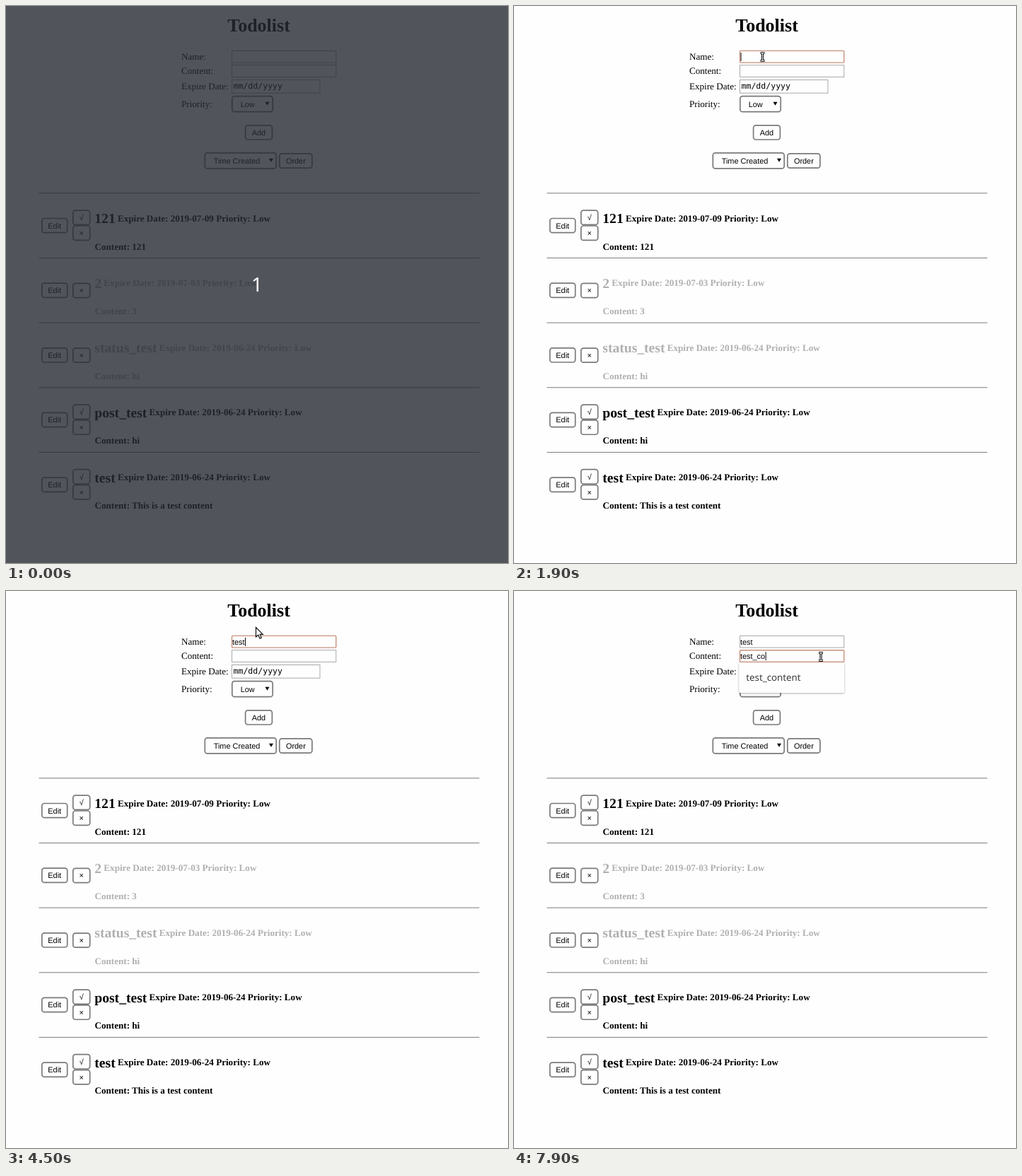
An HTML page for the animation above (8 s loop, 710 by 788 pixels).

```html
<!DOCTYPE html>
<html lang="en">
<head>
<meta charset="utf-8">
<title>Todolist</title>
<style>
  html, body { margin: 0; width: 100%; height: 100%; overflow: hidden; background: #fefefe; }
  svg { display: block; width: 710px; height: 788px; }
  text { font: 13.12px "Liberation Serif", serif; text-rendering: geometricPrecision; white-space: pre; }
  .title { font-size: 26px; font-weight: bold; text-anchor: middle; }
  .item text, .item tspan { font-weight: bold; }
  .name { font-size: 19.6px; }
  .done { fill: #b0b0b0; }
  .ui { font: 10.9px "Liberation Sans", sans-serif; }
  .mid { text-anchor: middle; }
  .date { font: 11.55px "DejaVu Sans Mono", monospace; }
  .btn { fill: #fefefe; stroke: #7a7a7a; stroke-width: 1.7; }
  .field { fill: #fefefe; stroke: #a9a9a9; }
  .focus { stroke: #c8917c; stroke-width: 1.4; }
  .rule { stroke: #7b7b7b; }
  .list { filter: drop-shadow(0 1px 1.5px rgba(0, 0, 0, .3)); }
  .list text { font: 500 13.3px "Noto Sans", sans-serif; fill: #3c3c3c; }
  .ime text { font: 15.5px "Noto Sans CJK SC", "Noto Sans CJK", sans-serif; fill: #2d7fc1; }
  .ime .first { fill: #b8201c; }
  .count { font: 28px "Noto Sans", sans-serif; fill: #fff; text-anchor: middle; }
</style>
</head>
<body>
<svg viewBox="0 0 710 788">
  <defs>
    <linearGradient id="sheen" x2="0" y2="1">
      <stop offset="0" stop-color="#fff"/><stop offset="1" stop-color="#f7f8f9"/>
    </linearGradient>
  </defs>
  <g id="page"></g>
  <g id="fields"></g>
  <g id="popups"></g>
  <path id="arrow" d="M0 0V13.5L3.2 10.7L5.5 15.8L7.8 14.8L5.6 9.9H9.8Z" fill="#fff" stroke="#111" stroke-width="1.2"/>
  <g id="beam" fill="none">
    <path d="M-3-5.5H3M0-5.5V5.5M-3 5.5H3" stroke="#111" stroke-width="3.2"/>
    <path d="M-2.6-5.5H2.6M0-5.5V5.5M-2.6 5.5H2.6" stroke="#fff" stroke-width="1"/>
  </g>
  <g id="cover">
    <rect width="710" height="788" fill="rgb(39,42,50)" opacity=".8"/>
    <text class="count" x="355" y="403.5">1</text>
  </g>
</svg>
<script>
const $ = id => document.getElementById(id);
const text = (x, y, s, cls = '') => `<text x="${x}" y="${y}" class="${cls}">${s}</text>`;
const box = (x, y, w, h, cls, rx = 0) =>
  `<rect x="${x}" y="${y}" width="${w}" height="${h}" rx="${rx}" class="${cls}"/>`;
const button = (x, y, w, h, label, tx = x + w / 2) =>
  box(x + .8, y + .8, w - 1.6, h - 1.6, 'btn', 3.4) + text(tx, y + h / 2 + 3.9, label, 'ui mid');
const chevron = (x, y) => `<path d="M${x - 3} ${y - 2.5}h6l-3 5z"/>`;

const items = [
  ['121', '2019-07-09', '121'],
  ['2', '2019-07-03', '3', true],
  ['status_test', '2019-06-24', 'hi', true],
  ['post_test', '2019-06-24', 'hi'],
  ['test', '2019-06-24', 'This is a test content'],
];

function item([name, date, content, done], i) {
  const buttons = done ? button(94, 300, 25.5, 21.7, '×')
    : button(94, 288.3, 25.5, 21.9, '√') + button(94, 310.2, 25.5, 21.9, '×');
  const cls = done ? 'done' : '';
  return `<g class="item" transform="translate(0 ${91.65 * i})">
    <path class="rule" d="M46.5 264.8H669.5"/>
    <text x="125.3" y="307" class="${cls}"><tspan class="name">${name}</tspan><tspan dy="-2.5"> Expire Date: ${date} Priority: Low</tspan></text>
    ${text(125.5, 344.5, 'Content: ' + content, cls)}</g>
    <g transform="translate(0 ${91.65 * i})">${button(50, 299.7, 37.5, 21.8, 'Edit')}${buttons}</g>`;
}

$('page').innerHTML = text(357.5, 36, 'Todolist', 'title')
  + text(248, 75.7, 'Name:') + text(248, 96.1, 'Content:')
  + text(248, 118, 'Expire Date:') + text(248, 142.6, 'Priority:')
  + box(319.5, 104.5, 124.5, 18.7, 'field') + text(321.5, 117.4, 'mm/dd/yyyy', 'date')
  + button(319, 126.8, 59, 23.7, 'Low', 341.7) + chevron(369.5, 138.2)
  + button(337.8, 168, 39.4, 21.8, 'Add')
  + button(280.5, 207, 102.5, 23.7, 'Time Created', 326.5) + chevron(375, 218.3)
  + button(386, 208, 47.7, 22, 'Order')
  + items.map(item).join('');

// Each track is [start ms, value...]; the last entry already begun applies.
const at = (track, t) => track.findLast(k => k[0] <= t);

const names = ['121', 'status_test', 'test', 'K Dorne Medical Lactated Ringers 250ml',
  'OQE Medical Felquarin-K Ph 7.4 500ml', 'Farlen Dextrose 5%, NaCl 0.33% 1000ml'];
const contents = ['121', '3', 'hi', 'test', 'test_content', 'This is a test content'];
const long = contents.slice(4);

const nameList = [[0, 0], [2300, .5, names], [2400, 1, names], [3700, .76, names], [3800, .35, names],
  [3900, 0], [4600, .5, names.slice(1, 3)], [4700, 1, names.slice(1, 3)], [5300, 0]];
const contentList = [[0, 0], [6000, .5, contents], [6100, 1, contents], [6800, 1, long], [7000, 1, long.slice(0, 1)]];

const ime = [[0], [3600, 't', '他头挺天她', 251], [3800, 'te', '特忒铽忑慝', 251],
  [4000, 'tes', ['特色', '特殊', '特设', '特', '忒'], 310],
  [4200, 'test', ['特殊他', '特殊', 'test', '特', '忒'], 350], [4500]];

const nameText = [[0, ''], [3600, 't'], [3800, 'te'], [4000, 'tes'], [4200, 'test']];
const contentText = [[0, ''], [6600, 't'], [6700, 'te'], [6800, 'tes'], [7000, 'test'],
  [7500, 'test_'], [7800, 'test_c'], [7900, 'test_co']];

const path = [[0, 488, 243], [100, 488, 243], [900, 428, 132], [1300, 348.5, 78.5], [1500, 348.5, 78.5],
  [1600, 348.5, 75.5], [1700, 348.5, 75.5], [1800, 351.5, 72], [2300, 351.5, 72], [2600, 353, 104],
  [2700, 353, 104], [3100, 353.5, 51.5], [4500, 353.5, 51.5], [5100, 510, 112], [5200, 510, 112],
  [5300, 518, 120], [5600, 497, 118], [5800, 434, 93], [8000, 434, 93]];

function pointer(t) {
  const i = path.findLastIndex(k => k[0] <= t);
  const [t0, x0, y0] = path[i], [t1, x1, y1] = path[i + 1];
  const p = (t - t0) / (t1 - t0);
  return [x0 + (x1 - x0) * p, y0 + (y1 - y0) * p];
}

function field(y, value, focused, caretEnd) {
  const widths = { t: .278, e: .556, s: .5, _: .556, c: .5, o: .556 };
  const w = caretEnd ? [...value].reduce((sum, c) => sum + widths[c] * 10.9, 0) : 0;
  return box(319.5, y, 147.3, 16.7, 'field' + (focused ? ' focus' : ''), focused ? 1 : 0)
    + text(320, y + 12.2, value, 'ui')
    + (focused ? `<path d="M${321 + w} ${y + 2.5}v12" stroke="#000"/>` : '');
}

function list(x, y, [, opacity, rows], width, hover) {
  if (!opacity) return '';
  return `<g class="list" opacity="${opacity}">`
    + box(x, y, width, 14 + 29.1 * rows.length, '" fill="#fefefe', 1.5)
    + (hover ? box(x, y + 7, width, 29, '" fill="#f1f0ef') : '')
    + rows.map((s, i) => text(x + 10, y + 25.5 + 29.2 * i, s)).join('') + '</g>';
}

function imePanel([, typed, words, width]) {
  if (!typed) return '';
  let x = 330;
  const choices = [...words].map((word, i) => {
    const out = text(x, 139, `${i + 1}.${word}`, i ? '' : 'first');
    x += 23 + 15.4 * (word === 'test' ? 2 : word.length);
    return out;
  }).join('');
  const caret = 330 + [...typed].reduce((sum, c) => sum + (c === 't' ? 6.2 : 8), 0) + 1.2;
  return `<g class="ime"><rect x="320.5" y="86.5" width="${width}" height="60.5" fill="url(#sheen)" stroke="#b5bccb"/>
    <path d="M321 117.5h${width - 1}" stroke="#e6e8ec"/>
    <circle cx="${320 + width - 12.5}" cy="99" r="12" fill="#dd987a"/>
    ${text(329.5, 108.5, typed)}<path d="M${caret} 96v16" stroke="#a33" stroke-width="1.2"/>${choices}
    <path d="M${x + 9} 126.5v8l-5-4z" fill="#a9cbe6"/><path d="M${x + 17} 126v9l6-4.5z" fill="#2d7fc1"/></g>`;
}

let shown = -1;
function draw(now) {
  const t = Math.floor(now % 8000 / 100) * 100;
  if (t !== shown) {
    shown = t;
    const onName = t >= 1900 && t < 5300, onContent = t >= 6000;
    $('fields').innerHTML = field(63.4, at(nameText, t)[1], onName, t >= 4500)
      + field(83.7, at(contentText, t)[1], onContent, true);
    $('popups').innerHTML = list(320, 82, at(nameList, t), t < 4500 ? 291 : 148, t >= 2600 && t < 2900)
      + list(318.3, 101, at(contentList, t), t < 7000 ? 165 : 148.7)
      + imePanel(at(ime, t));
    const [x, y] = pointer(t);
    const beam = t >= 1800 && t < 2500 || t >= 5800;
    for (const [id, on] of [['arrow', !beam && t >= 100], ['beam', beam]]) {
      $(id).setAttribute('transform', `translate(${x} ${y})`);
      $(id).style.display = on ? '' : 'none';
    }
    $('cover').style.display = t < 100 ? '' : 'none';
  }
}

const start = performance.now();
function tick() {
  draw(performance.now() - start);
  requestAnimationFrame(tick);
}
tick();
</script>
</body>
</html>
```
